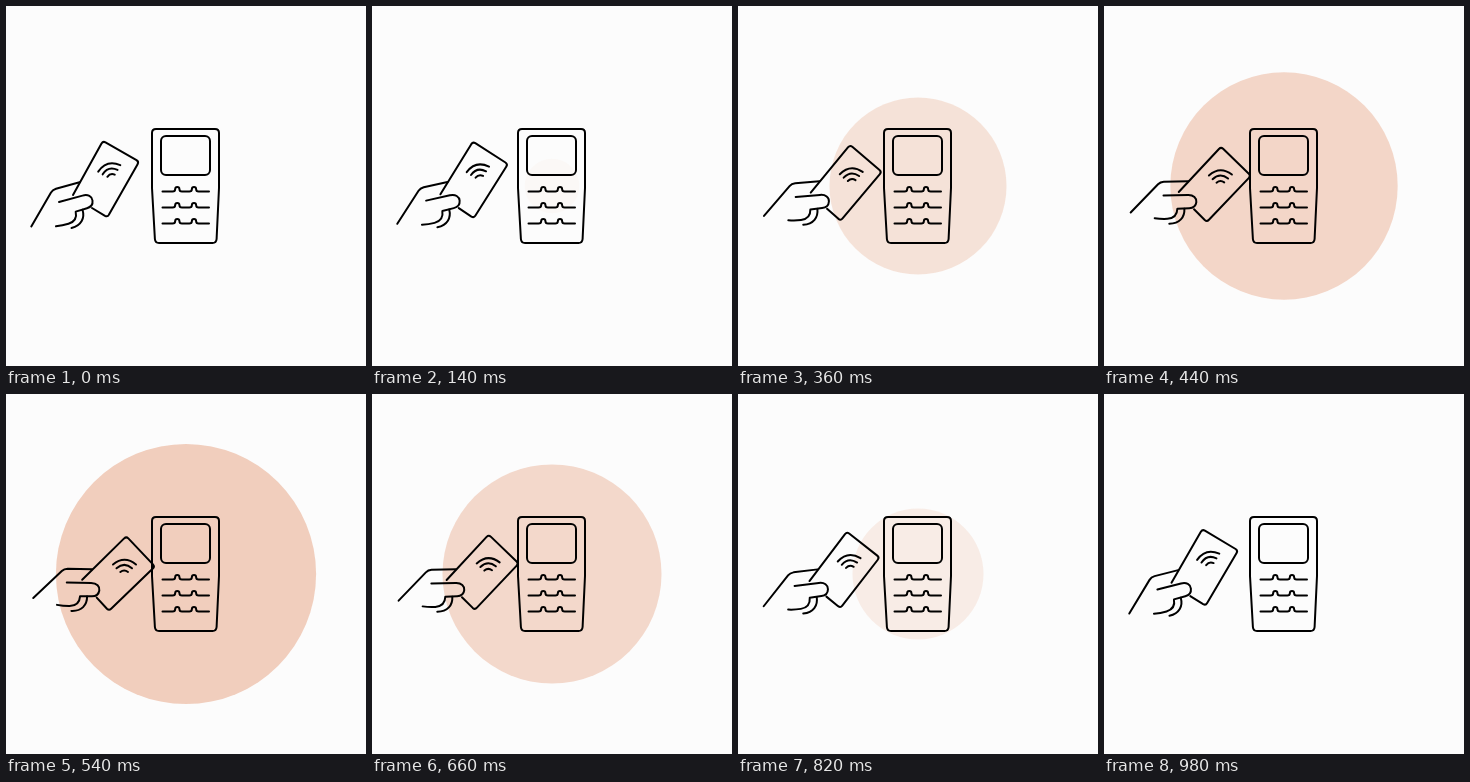
An HTML page for the animation above (1 s loop, 360 by 360 pixels).

```html
<!DOCTYPE html>
<html lang="en">
<head>
<meta charset="utf-8">
<title>Contactless payment</title>
<style>
  html, body { margin: 0; height: 100%; overflow: hidden; background: #fcfcfc; }
  svg { display: block; width: 100%; height: 100%; }
  .ink { fill: none; stroke: #000; stroke-width: 2; stroke-linecap: round; stroke-linejoin: round; }
</style>
</head>
<body>
<svg viewBox="0 0 360 360">
  <defs>
    <path id="keys" d="M156.5 0H166.5Q169.2 0 169.2-2.5Q169.2-4.5 171.3-4.5T173.4-2.5Q173.4 0 176 0H183.2Q185.9 0 185.9-2.5Q185.9-4.5 188-4.5T190.1-2.5Q190.1 0 192.7 0H203"/>
  </defs>
  <circle id="glow" cx="180" cy="180" r="0" fill="#f1cdbb"/>
  <g class="ink">
    <path d="M150 123H209Q213 123 213 127V182L210.6 233Q210.3 237 206.5 237H153Q149.2 237 148.9 233L146 182V127Q146 123 150 123Z"/>
    <rect x="155" y="130" width="49" height="39" rx="5"/>
    <use href="#keys" y="185.5"/>
    <use href="#keys" y="201.5"/>
    <use href="#keys" y="217.5"/>
    <g id="hand">
      <!-- card -->
      <path d="M67 189L95.5 137.5Q97 135 99.5 136.3L130.5 154.2Q133 155.7 131.6 158.2L103 208.6Q101.6 211.2 99 209.8L86 202"/>
      <path transform="rotate(-16.5 83 219)" d="M107 170.5Q118.5 161 130 170.5M110.5 174.3Q118.3 167.5 126 174.3M114.3 178Q118.2 175 122 178"/>
      <!-- wrist, thumb, fingers -->
      <path d="M25.3 220.5L45 186.5Q46.6 183.8 50 182.7L73.5 176.3"/>
      <path d="M53 196L76.5 189.6C82 188 86 190.5 86.5 194.5C87 198.5 84.5 201.2 81 202.2L69.7 205.6C71 211.5 68.5 215.8 62.5 217.8C58 219.2 54 219.9 50 220.3"/>
      <path d="M76.5 203.8C79 212 75.5 219.5 65.5 222"/>
    </g>
  </g>
</svg>
<script>
  const LOOP = 1000, HALF = LOOP / 2, TILT = 16.9, RADIUS = 133;
  const glow = document.getElementById('glow');
  const hand = document.getElementById('hand');

  // Both legs accelerate: toward the terminal, then back.
  function swing(t, outPow, backPow) {
    return t < HALF ? (t / HALF) ** outPow : 1 - (t / HALF - 1) ** backPow;
  }

  function draw(now) {
    const t = now % LOOP;
    const tilt = TILT * swing(t, 1.46, 1.5);
    const size = swing(t, 1.25, 1.53);
    hand.setAttribute('transform', `rotate(${tilt} 83 219)`);
    glow.setAttribute('r', RADIUS * size);
    glow.setAttribute('opacity', size ** 1.5);
  }

  const start = performance.now();
  function frame() {
    draw(performance.now() - start);
    requestAnimationFrame(frame);
  }
  frame();
</script>
</body>
</html>
```
